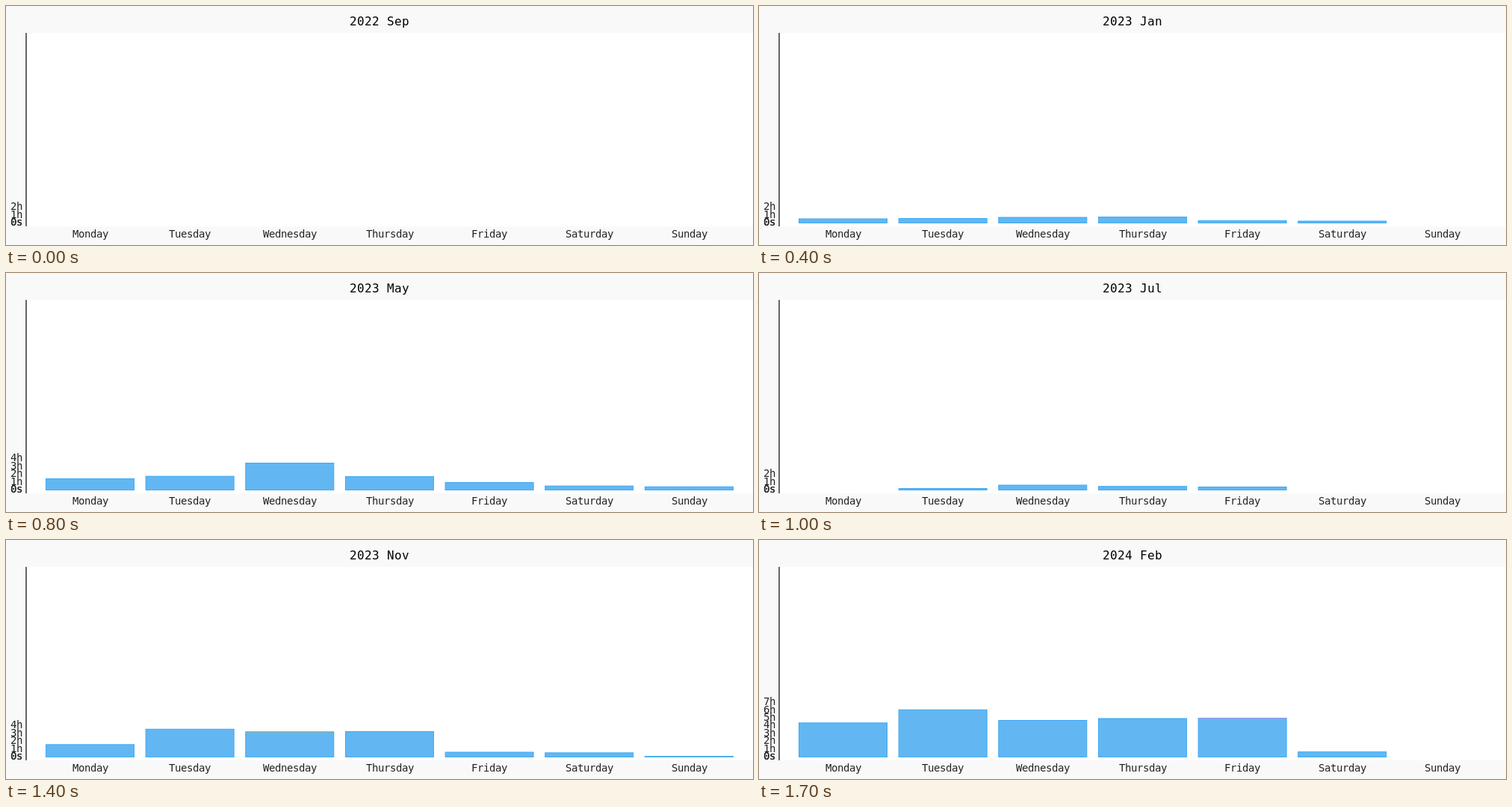
These frames come from a looping animation (1000x320 px, 1.8 s). An HTML page with a canvas:

```html
<!DOCTYPE html>
<html lang="en">
<head>
<meta charset="utf-8">
<title>Hours per weekday</title>
<style>
html, body { margin: 0; width: 100%; height: 100%; overflow: hidden; background: #f9f9f9; }
canvas { display: block; }
</style>
</head>
<body>
<canvas id="chart" width="1000" height="320"></canvas>
<script>
const ctx = document.getElementById('chart').getContext('2d');

const STEP = 100, MONTHS = 18;
const BASE = 290.5, HOUR = 10.4;
const LEFT = 53.5, PITCH = 133.65, BAR = 118;
const BLUE = '#62b7f3', EDGE = '#40a8f0';

const dayNames = ['Monday', 'Tuesday', 'Wednesday', 'Thursday', 'Friday', 'Saturday', 'Sunday'];
const monthNames = ['Jan', 'Feb', 'Mar', 'Apr', 'May', 'Jun', 'Jul', 'Aug', 'Sep', 'Oct', 'Nov', 'Dec'];

// Bar heights in px by months since Sep 2022; months between are interpolated.
const keys = [
  [0, [0, 0, 0, 0, 0, 0, 0]],
  [2, [27.5, 44.5, 14, 28, 8, 0.8, 11]],
  [4, [5.5, 6, 7.5, 8, 3, 2.5, 0]],
  [6, [30, 34.7, 65.5, 31, 16, 10.7, 8.6]],
  [10, [0, 2, 6.5, 4.8, 4, 0, 0]],
  [14, [16.6, 37.2, 33.6, 34.1, 6.4, 5.6, 0.8]],
  [17, [45.6, 63.2, 49, 51.5, 52, 6.8, 0]]
];

// Bars capped by a thin differently coloured segment: month -> [day, colour].
const caps = { 14: [2, '#a3b86c'], 17: [4, '#a58be8'] };

function heights(month) {
  const i = keys.findIndex(k => k[0] >= month);
  const [end, b] = keys[i];
  if (end === month) return b;
  const [start, a] = keys[i - 1];
  const u = (month - start) / (end - start);
  return a.map((v, d) => v + (b[d] - v) * u);
}

function text(str, x, y, size, color, align) {
  ctx.font = `${size}px "DejaVu Sans Mono", monospace`;
  ctx.letterSpacing = '0px';
  const natural = ctx.measureText('0').width;
  // Whole-pixel advances, as with hinted monospace text.
  const advance = Math.round(natural);
  ctx.letterSpacing = `${advance - natural}px`;
  ctx.textAlign = 'left';
  ctx.fillStyle = color;
  const shift = align === 'center' ? 0.5 : 1;
  ctx.fillText(str, Math.round(x - str.length * advance * shift), y);
}

function line(x1, y1, x2, y2, color, width) {
  ctx.strokeStyle = color;
  ctx.lineWidth = width;
  ctx.beginPath();
  ctx.moveTo(x1, y1);
  ctx.lineTo(x2, y2);
  ctx.stroke();
}

function bar(x, h) {
  ctx.fillStyle = BLUE;
  ctx.fillRect(x, BASE - h, BAR, h);
  ctx.strokeStyle = EDGE;
  ctx.lineWidth = 1;
  ctx.strokeRect(x, BASE - h, BAR, h);
}

function draw(month) {
  ctx.fillStyle = '#f9f9f9';
  ctx.fillRect(0, 0, 1000, 320);
  ctx.fillStyle = '#fff';
  ctx.fillRect(27, 36, 973, 259);
  line(27, 36, 27, 295, '#666', 2);

  const date = month + 8;
  text(`${2022 + Math.floor(date / 12)} ${monthNames[date % 12]}`, 500, 26, 16, '#000', 'center');

  const values = heights(month);
  values.forEach((h, d) => {
    const x = LEFT + d * PITCH;
    if (h > 0) bar(x, h);
    text(dayNames[d], x + BAR / 2 + 0.3, 310, 14, '#222', 'center');
  });

  const cap = caps[month];
  if (cap) {
    const x = LEFT + cap[0] * PITCH, y = BASE - values[cap[0]];
    line(x, y, x + BAR, y, cap[1], 1);
  }

  const top = Math.max(2, Math.ceil(Math.max(...values) / HOUR));
  text('0s', 22, 294, 14, '#000', 'right');
  for (let h = 0; h <= top; h++) {
    text(h ? h + 'h' : '0s', 22, Math.round(294 - h * HOUR), 14, '#222', 'right');
  }
}

const start = performance.now();
let shown = -1;

function tick() {
  const month = Math.floor((performance.now() - start) / STEP) % MONTHS;
  if (month !== shown) draw(shown = month);
  requestAnimationFrame(tick);
}
tick();
</script>
</body>
</html>
```
